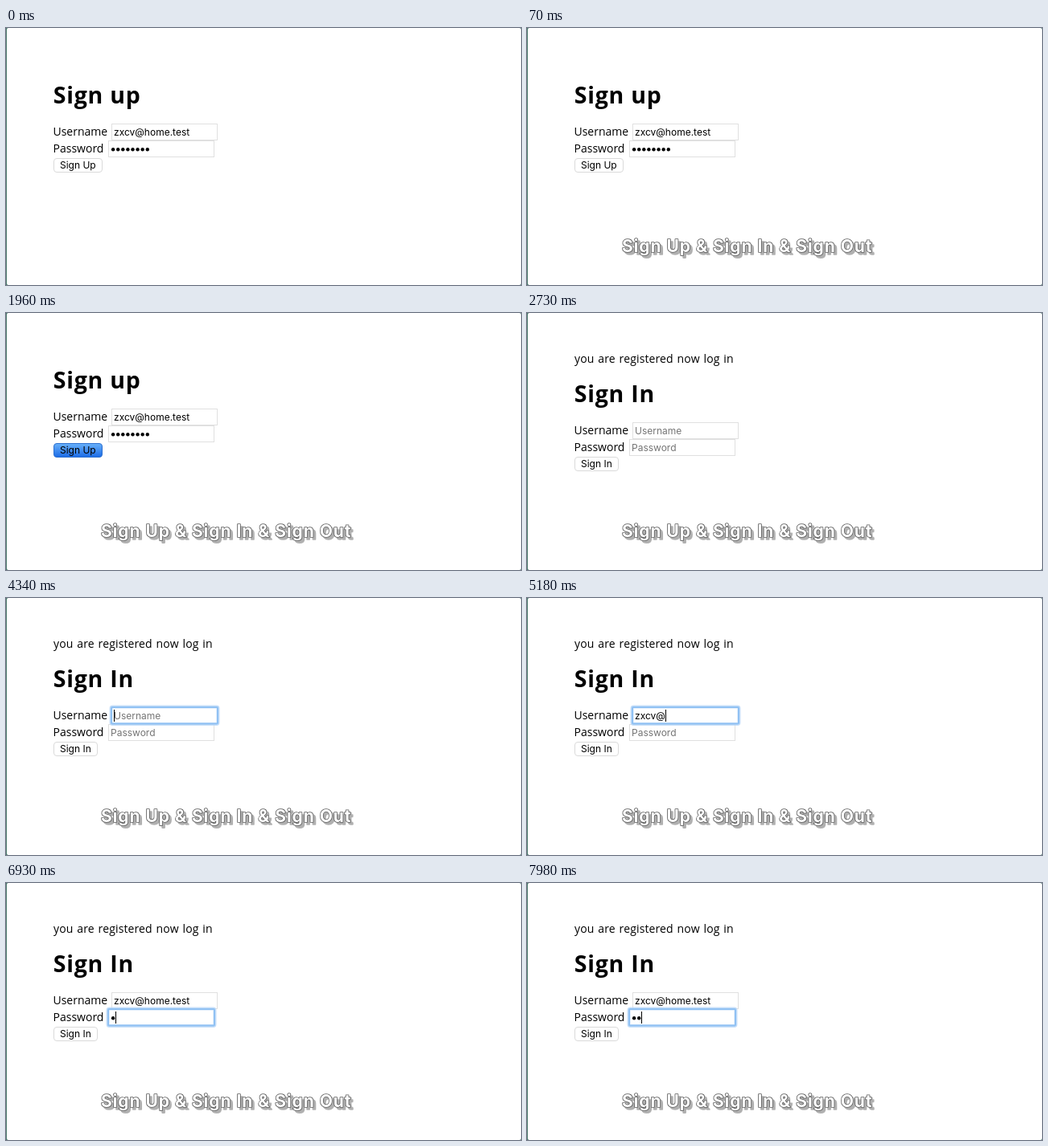
Write an HTML page that moves like this. It is 640 px wide and 320 px high and loops after 8 s.

```html
<!DOCTYPE html>
<html lang="en">
<head>
<meta charset="utf-8">
<title>Sign up and sign in</title>
<style>
  html, body { margin: 0; width: 100%; height: 100%; overflow: hidden; background: #fff; }
  svg { display: block; width: 640px; height: 320px; }
  text { white-space: pre; fill: #000; }
  .label { font: 500 14px "Open Sans", "Noto Sans", sans-serif; }
  #notice { letter-spacing: .14px; word-spacing: 1px; }
  .title { font: 700 28.5px "Open Sans", "Noto Sans", sans-serif; letter-spacing: .8px; }
  .ui { font: 12px Inter, "Liberation Sans", sans-serif; }
  .hint { fill: #757575; }
  .box { fill: #fff; stroke: #e0e0e0; }
  .ring rect { fill: none; }
  .glow { stroke: #b9d8f8; stroke-width: 4; opacity: .8; }
  .edge { stroke: #90c1f3; stroke-width: 2; }
  #caption {
    font: 700 21px Inter, "Open Sans", sans-serif;
    letter-spacing: .95px;
    fill: #fff;
    stroke: #5c5c5c;
    stroke-width: 1.6px;
    stroke-linejoin: round;
    paint-order: stroke;
    filter: drop-shadow(3px 3px .7px #b0b0b0);
  }
</style>
</head>
<body>
<svg viewBox="0 0 640 320">
  <defs>
    <linearGradient id="blue" x2="0" y2="1">
      <stop offset="0" stop-color="#69b1fa"/>
      <stop offset="1" stop-color="#1a6ae6"/>
    </linearGradient>
  </defs>
  <rect width="640" height="320" fill="#4a7a6c"/>
  <rect x="1" width="639" height="320" rx="2" fill="#fff"/>

  <text id="notice" class="label" x="59" y="62">you are registered now log in</text>

  <g id="form">
    <text id="title" class="title" x="58.7" y="94"></text>
    <text class="label" x="58.5" y="134">Username</text>
    <text class="label" x="58.5" y="155">Password</text>
    <rect class="box" x="131.5" y="119.5" width="131" height="20"/>
    <rect class="box" x="127.5" y="140.5" width="131" height="20"/>
    <g id="ring" class="ring">
      <rect class="glow" x="130.5" y="118.5" width="133" height="21.5" rx="2"/>
      <rect class="edge" x="131" y="119" width="132" height="20.5" rx="1"/>
    </g>
    <text id="user" class="ui" x="134" y="134"></text>
    <text id="passHint" class="ui hint" x="130" y="155">Password</text>
    <g id="dots"></g>
    <rect id="caret" width="1" height="15"/>
    <rect id="button" x="59.5" y="162.5" height="17" rx="3.5"/>
    <text id="buttonText" class="ui" x="67" y="175"></text>
  </g>

  <text id="caption" x="118" y="278.5">Sign Up &amp; Sign In &amp; Sign Out</text>
</svg>
<script>
const LOOP = 8000, SIGN_IN = 2730, DOT_STEP = 6.1;
const EMAIL = 'zxcv@home.test';

// Each track is a list of [start ms, value].
const focus = [[0, ''], [980, 'pass'], [1960, ''], [4340, 'user'], [6650, 'pass']];
const caretOn = [[0, 0], [980, 1], [1470, 0], [4340, 1], [7630, 0], [7910, 1]];
const typed = [[0, 14], [SIGN_IN, 0], [4760, 1], [4830, 2], [4900, 3], [4970, 4], [5180, 5],
  [5530, 6], [5600, 7], [5740, 8], [5950, 9], [6090, 10], [6230, 11], [6370, 13], [6440, 14]];
const masked = [[0, 8], [SIGN_IN, 0], [6930, 1], [7070, 2], [7630, 1], [7770, 0], [7910, 1], [7980, 2]];

const el = id => document.getElementById(id);
const at = (track, t) => track.findLast(([start]) => start <= t)[1];
const show = (node, on) => node.setAttribute('visibility', on ? 'visible' : 'hidden');
const set = (node, attrs) => Object.entries(attrs).forEach(([k, v]) => node.setAttribute(k, v));
const write = (node, s) => { if (node.textContent !== s) node.textContent = s; };

for (let i = 0; i < 8; i++) {
  const dot = document.createElementNS('http://www.w3.org/2000/svg', 'circle');
  set(dot, { cx: 133.1 + i * DOT_STEP, cy: 151.3, r: 2.2 });
  el('dots').append(dot);
}

function draw(t) {
  const signIn = t >= SIGN_IN;
  const pressed = t >= 1960 && t < 2100;
  const field = at(focus, t), chars = at(typed, t), dots = at(masked, t);

  show(el('notice'), signIn);
  show(el('caption'), t >= 70);
  set(el('form'), { transform: `translate(0 ${signIn ? 17 : 0})` });
  write(el('title'), signIn ? 'Sign In' : 'Sign up');
  write(el('buttonText'), signIn ? 'Sign In' : 'Sign Up');
  set(el('button'), {
    width: signIn ? 54 : 60,
    fill: pressed ? 'url(#blue)' : '#fff',
    stroke: pressed ? '#2d70d0' : '#dadada'
  });

  const user = el('user');
  write(user, chars ? EMAIL.slice(0, chars) : 'Username');
  user.classList.toggle('hint', !chars);
  show(el('passHint'), !dots);
  [...el('dots').children].forEach((dot, i) => show(dot, i < dots));

  const inPass = field === 'pass';
  show(el('ring'), field);
  set(el('ring'), { transform: inPass ? 'translate(-4 21)' : '' });
  show(el('caret'), at(caretOn, t));
  const end = inPass ? 130 + dots * DOT_STEP
    : 134 + (chars ? user.getComputedTextLength() : 0);
  set(el('caret'), { x: Math.round(end), y: inPass ? 143 : 122 });
}

function tick() {
  draw(performance.now() % LOOP);
  requestAnimationFrame(tick);
}
tick();
</script>
</body>
</html>
```
